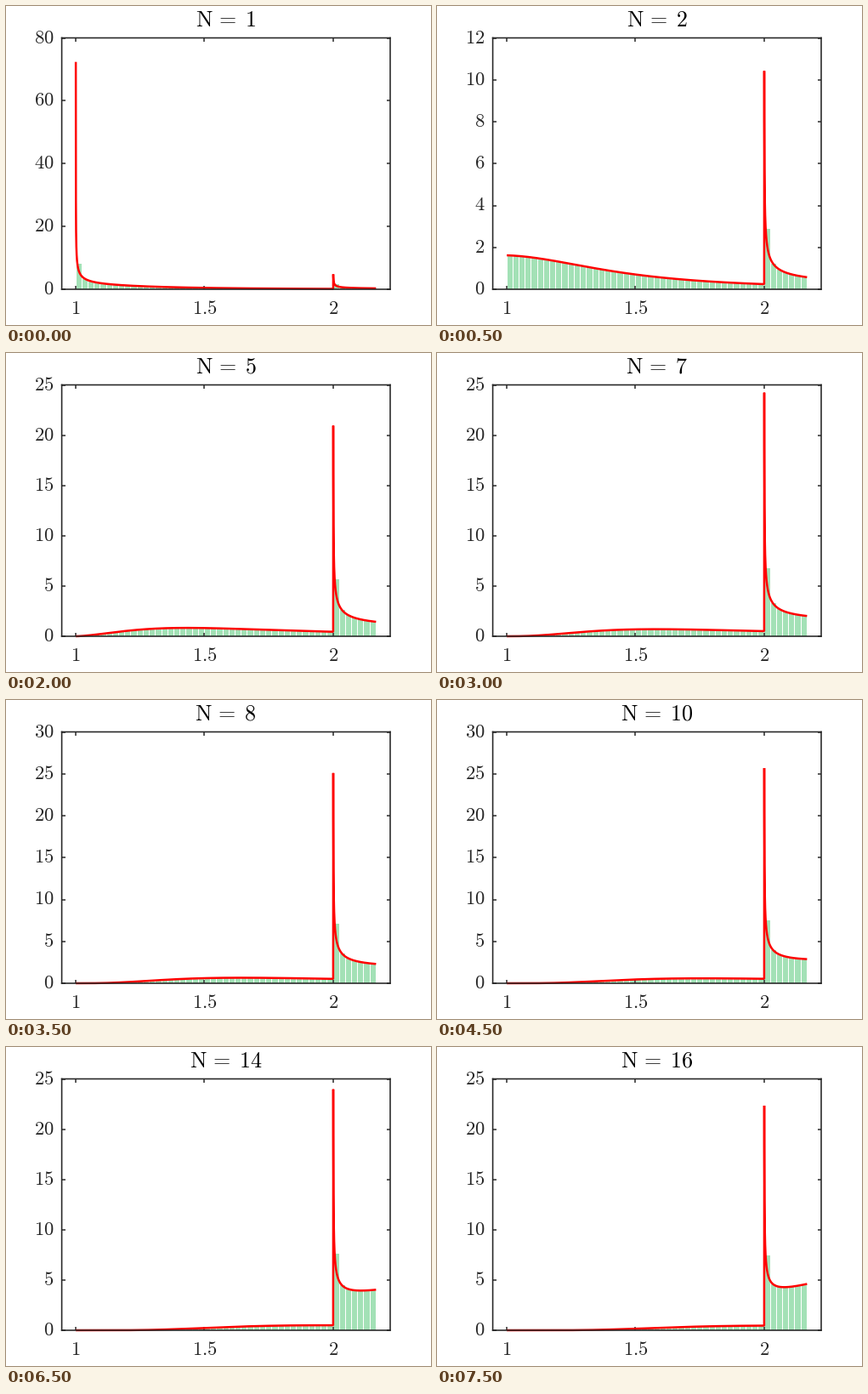
Write a matplotlib script that moves like this. It is 500 px wide and 375 px high and loops after 8 s.

```python
import numpy as np
import matplotlib.pyplot as plt
from matplotlib.animation import FuncAnimation

W, H, DPI = 500, 375, 100
PX = 72 / DPI
INK = "#262626"
GREEN = "#a3e1b6"
LEFT, RIGHT, TOP, BOTTOM = 65.6, 452, 37.5, 333
X1, UNIT = 82.1, 302.8  # pixel of x = 1, pixels per unit

plt.rcParams["mathtext.fontset"] = "cm"

# Radius r of a uniform point in the unit N-ball, as a function of x.
R0, X_END, BINS = 0.902, 13 / 6, 49
A, B = 0.1225, -0.012
Q0 = 0.0184  # the curve resumes at x = 2 + Q0**2

s = np.linspace(0, 1, 2001)
ds = 1 / (1 + 0.2 * s**2 + 3.5 * s**4)
area = np.concatenate([[0], np.cumsum((ds[1:] + ds[:-1]) / 2 * np.diff(s))])
r_of_s = R0 * area / area[-1]
dr_ds = R0 * ds / area[-1]


def radius(x):
    low = np.interp(np.sqrt(np.clip(x - 1, 0, 1)), s, r_of_s)
    v = np.maximum(x - 2, 0)
    high = R0 + 2 * A * np.sqrt(v) + B * v
    return np.where(x <= 2, low, np.minimum(high, 1))


def density(n):
    """Curve points of the density of x in n dimensions."""
    u = np.linspace(0.0088, 1, 500)
    r = np.interp(u, s, r_of_s)
    left = n * r ** (n - 1) * np.interp(u, s, dr_ds) / (2 * u)

    q = np.linspace(Q0, np.sqrt(X_END - 2), 250)
    r = R0 + 2 * A * q + B * q**2
    r[0] = R0
    soften = 1 - 0.28 / n**1.1 * np.exp((Q0 - q) / 0.02)
    right = n * r ** (n - 1) * (A / q + B) * soften
    return np.concatenate([1 + u**2, 2 + q**2]), np.concatenate([left, right])


def y_step(top):
    return next(k for k in (1, 2, 5, 10, 20, 50) if top / k <= 6)


def label(v):
    return rf"$\mathrm{{{v:g}}}$"


fig = plt.figure(figsize=(W / DPI, H / DPI), dpi=DPI, facecolor="white")
ax = fig.add_axes([LEFT / W, 1 - BOTTOM / H, (RIGHT - LEFT) / W, (BOTTOM - TOP) / H])
ax.set_xlim(1 + (LEFT - X1) / UNIT, 1 + (RIGHT - X1) / UNIT)
ax.set_xticks([1, 1.5, 2], [label(v) for v in (1, 1.5, 2)])
ax.tick_params(direction="in", top=True, right=True, length=4 * PX,
               width=1.5 * PX, color=INK, labelcolor=INK, labelsize=22.5 * PX)
ax.tick_params(axis="x", pad=13.3 * PX)
ax.tick_params(axis="y", pad=9 * PX)
for spine in ax.spines.values():
    spine.set(color=INK, linewidth=1.6 * PX, snap=False)

edges = np.linspace(1, X_END, BINS + 1)
bin_w = edges[1] - edges[0]
bars = ax.bar(edges[:-1] + bin_w / 2, np.zeros(BINS), 0.86 * bin_w, color=GREEN)
curve, = ax.plot([], [], color="red", lw=2.5 * PX, clip_on=False,
                 solid_capstyle="butt", solid_joinstyle="bevel")
title = fig.text((LEFT + RIGHT) / 2 / W, 1 - 24 / H, "", ha="center",
                 va="baseline", fontsize=26 * PX, color="black")


def draw(i):
    n = i + 1
    x, p = density(n)
    curve.set_data(x, p)
    for bar, h in zip(bars, np.diff(radius(edges) ** n) / bin_w):
        bar.set_height(h)
    step = y_step(p.max())
    top = step * np.ceil(p.max() / step)
    ticks = np.arange(0, top + step / 2, step)
    ax.set_ylim(0, top)
    ax.set_yticks(ticks, [label(v) for v in ticks])
    for text in ax.get_yticklabels():
        text.set_verticalalignment("center")
    title.set_text(rf"$\mathrm{{N}}\,=\;\mathrm{{{n}}}$")
    return [curve, title, *bars]


anim = FuncAnimation(fig, draw, frames=16, interval=500, repeat=True, repeat_delay=0)
plt.show()
```
